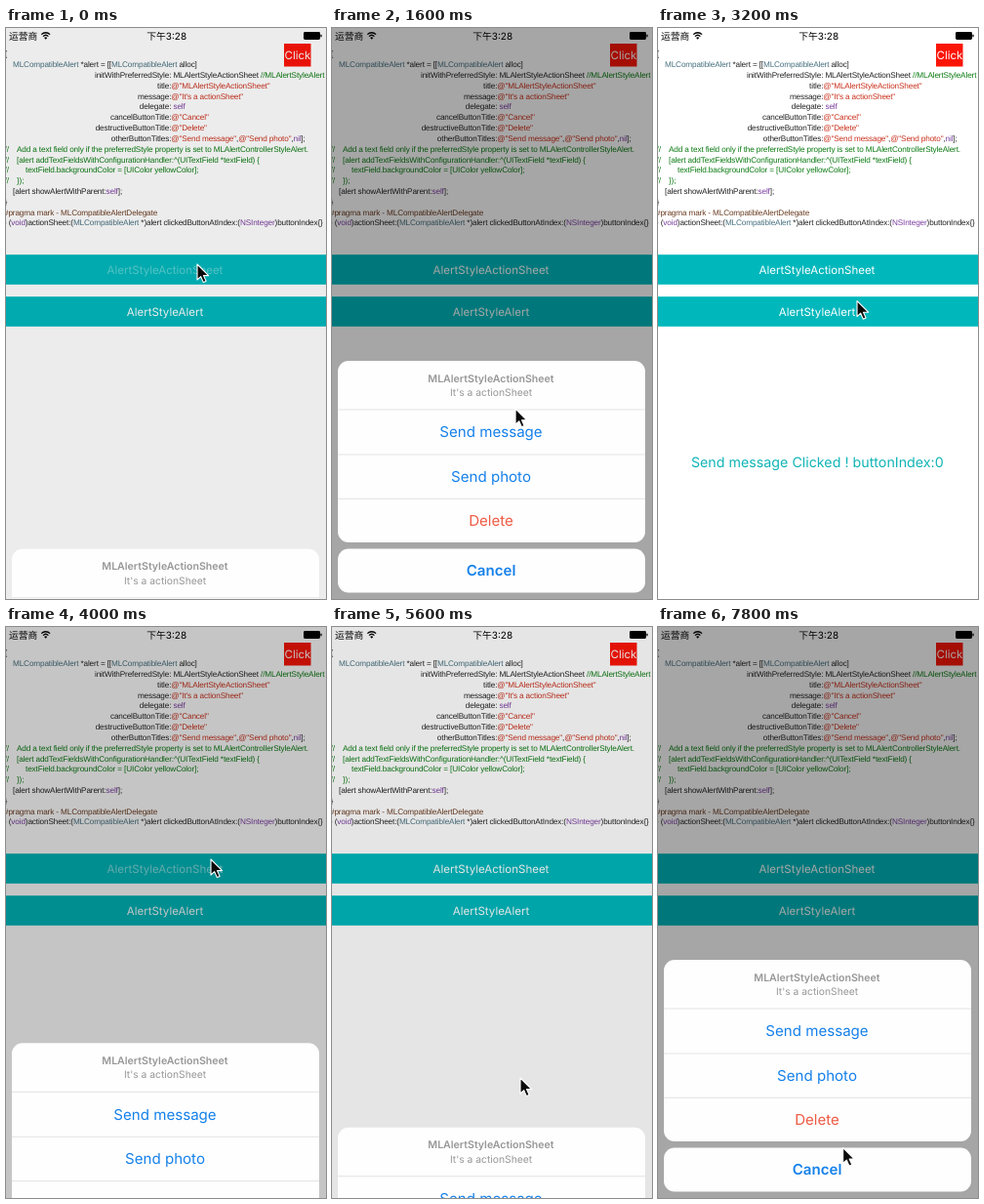
An HTML page for the animation above (8 s loop, 328 by 585 pixels).

```html
<!DOCTYPE html>
<html lang="en">
<head>
<meta charset="utf-8">
<title>Action sheet demo</title>
<style>
  html, body { margin: 0; width: 100%; height: 100%; overflow: hidden; background: #fff; }
  svg { display: block; width: 100vw; height: 100vh; font-family: Inter, Roboto, sans-serif; text-rendering: geometricPrecision; }
  text { white-space: pre; }
  .code { font: 8.2px "Liberation Sans", Arial, sans-serif; letter-spacing: -.135px; fill: #222; }
  .cls { fill: #47707f; } .str { fill: #c9301c; } .com { fill: #0b7a12; }
  .key { fill: #7b3fa0; } .pre { fill: #6b3d22; }
  .cjk { font: 9.8px "Noto Sans CJK SC", "Noto Sans CJK", sans-serif; }
  .mid { text-anchor: middle; }
  .btn { font-size: 11.5px; fill: #fff; }
  .row { font-size: 15.1px; fill: #1580ea; }
  .gray { font-size: 10.3px; fill: #979797; }
</style>
</head>
<body>
<svg id="stage" viewBox="0 0 328 585" preserveAspectRatio="none">
  <rect width="328" height="585" fill="#fff"/>

  <g id="status">
    <text class="cjk" x="3" y="11.6">运营商</text>
    <path d="M36.3 6.6a6.2 6.2 0 0 1 8.8 0M38 8.6a3.9 3.9 0 0 1 5.4 0" fill="none" stroke="#000" stroke-width="1.3"/>
    <path d="M40.7 11.8l-1.6-1.8a2.3 2.3 0 0 1 3.2 0z"/>
    <text class="mid" x="164.7" y="11.6" font-size="10"><tspan class="cjk">下午</tspan>3:28</text>
    <rect x="305" y="4" width="17" height="8" rx="1.4"/>
    <rect x="322.4" y="6.6" width="1.2" height="2.8" rx=".6"/>
  </g>

  <g id="code" class="code"></g>

  <rect x="285" y="16" width="27.5" height="23.5" fill="#fb1507"/>
  <text class="mid" x="299" y="32" font-size="11.5" fill="#fff">Click</text>

  <g fill="#00b8bc">
    <rect y="232.2" width="328" height="30.6"/>
    <rect y="275.2" width="328" height="30.6"/>
  </g>
  <text id="press" class="btn mid" x="163" y="251.6">AlertStyleActionSheet</text>
  <text class="btn mid" x="163" y="294.8">AlertStyleAlert</text>
  <text id="label" class="mid" x="163.3" y="450.3" font-size="14.25"></text>

  <rect id="dim" width="328" height="585"/>

  <g id="sheet">
    <rect x="6" y="341" width="315" height="186" rx="11" fill="#fefefe"/>
    <rect id="glow" x="6" width="315" height="45" fill="#f1f2f2"/>
    <path d="M6 391h315M6 437h315M6 482.3h315" stroke="#dcdcdc" stroke-width=".8"/>
    <text class="gray mid" x="163" y="362.6" style="font-weight:600;font-size:10.6px">MLAlertStyleActionSheet</text>
    <text class="gray mid" x="163" y="376.8">It's a actionSheet</text>
    <text class="row mid" x="163" y="419.4">Send message</text>
    <text class="row mid" x="163" y="465">Send photo</text>
    <text class="row mid" x="163" y="510.4" style="fill:#ee5a43">Delete</text>
    <rect x="6" y="533.5" width="315" height="45" rx="11" fill="#fefefe"/>
    <text class="row mid" x="163" y="561.4" font-weight="600">Cancel</text>
  </g>

  <path id="cursor" d="M0 0V16L3.7 12.6L6.3 18.6L9.1 17.4L6.5 11.6H11.6Z" fill="#0a0a0a" stroke="#fff" stroke-width="1.1" stroke-linejoin="round"/>
</svg>

<script>
const $ = id => document.getElementById(id);
const code = $("code");

// Code listing: parts are plain strings or [class, string].
const COLON = 169.3;
let baseline = 29.2;

function write(x, parts, anchor = "start") {
  const text = document.createElementNS(code.namespaceURI, "text");
  text.setAttribute("x", x);
  text.setAttribute("y", baseline);
  text.setAttribute("text-anchor", anchor);
  for (const part of parts) {
    const [cls, str] = Array.isArray(part) ? part : ["", part];
    const span = document.createElementNS(code.namespaceURI, "tspan");
    span.setAttribute("class", cls);
    span.textContent = str;
    text.append(span);
  }
  code.append(text);
}

function line(x, ...parts) {
  write(x, parts);
  baseline += 10.83;
}

function argument(name, ...parts) {
  write(COLON, [name + ":"], "end");
  line(COLON, ...parts);
}

function comment(x, str) {
  write(-1.5, [["com", "//"]]);
  line(x, ["com", str]);
}

line(-1.5, "{");
line(7, ["cls", "MLCompatibleAlert"], " *alert = [[", ["cls", "MLCompatibleAlert"], " alloc]");
argument("initWithPreferredStyle", "\u00a0MLAlertStyleActionSheet ", ["com", "//MLAlertStyleAlert"]);
argument("title", ["str", '@"MLAlertStyleActionSheet"']);
argument("message", ["str", '@"It\'s a actionSheet"']);
argument("delegate", ["key", "\u00a0self"]);
argument("cancelButtonTitle", ["str", '@"Cancel"']);
argument("destructiveButtonTitle", ["str", '@"Delete"']);
argument("otherButtonTitles", ["str", '@"Send message"'], ",", ["str", '@"Send photo"'], ",", ["key", "nil"], "];");
comment(11, "Add a text field only if the preferredStyle property is set to MLAlertControllerStyleAlert.");
comment(11, "[alert addTextFieldsWithConfigurationHandler:^(UITextField *textField) {");
comment(20, "textField.backgroundColor = [UIColor yellowColor];");
comment(11, "});");
line(7, "[alert showAlertWithParent:", ["key", "self"], "];");
line(-1.5, "}");
line(-2, ["pre", "#pragma mark - MLCompatibleAlertDelegate"]);
line(-2, "- (", ["key", "void"], ")actionSheet:(", ["cls", "MLCompatibleAlert"],
  " *)alert clickedButtonAtIndex:(", ["key", "NSInteger"], ")buttonIndex{}");

// Each round: press the button, the sheet opens, pick a row, the sheet closes, a label reports it.
const rounds = [
  { open: -34, close: 1900, from: { x: 196, y: 242 }, pick: { x: 188, y: 391 }, name: "Send message", color: "#10b4b6" },
  { open: 3867, close: 5450, from: { x: 210, y: 238 }, pick: { x: 193, y: 462 }, name: "Send photo", color: "#f0862a" },
  { open: 6860, close: 8100, from: { x: 245, y: 250 }, pick: { x: 188, y: 542 }, name: "Cancel" }
];
const LOOP = 8000, STEP = 200, SLIDE = 450, REST = 500, HOLD = 250, REPORT = 700;
const HEIGHT = 244, SHADE = .35, ROW = 45.6;

const ramp = (t, a, b) => Math.min(1, Math.max(0, (t - a) / (b - a)));
const easeOut = k => 1 - (1 - k) ** 3;
const smooth = k => k * k * (3 - 2 * k);
const slide = (t, start) => easeOut(ramp(t, start, start + SLIDE));

function cursorAt(t) {
  const p = { ...rounds[0].from };
  const move = (to, a, b) => {
    const k = smooth(ramp(t, a, b));
    p.x += (to.x - p.x) * k;
    p.y += (to.y - p.y) * k;
  };
  rounds.forEach((round, i) => {
    if (i) move(round.from, rounds[i - 1].close + REST, round.open - HOLD);
    move(round.pick, round.open + REST, round.close - HOLD);
  });
  return p;
}

function draw(t) {
  const index = rounds.findLastIndex(r => t >= r.open);
  const { open, close, name, color } = rounds[index];
  const next = rounds[index + 1];
  const shown = slide(t, open) - slide(t, close);
  const held = next && t >= next.open - HOLD - 50;
  const { x, y } = cursorAt(t);

  $("sheet").setAttribute("transform", `translate(0 ${HEIGHT * (1 - shown)})`);
  $("dim").setAttribute("opacity", SHADE * shown);
  $("glow").setAttribute("y", 391.4 + ROW * index);
  $("glow").setAttribute("opacity", t >= close - HOLD ? 1 : 0);
  $("press").setAttribute("opacity", held ? .07 : .3 + .7 * ramp(t, open, open + SLIDE));
  $("label").textContent = t >= close + REPORT ? `${name} Clicked ! buttonIndex:${index}` : "";
  $("label").setAttribute("fill", color || "none");
  $("cursor").setAttribute("transform", `translate(${x} ${y})`);
}

// The screen refreshes in fixed steps.
const start = performance.now();
function tick() {
  const t = (performance.now() - start) % LOOP;
  draw(Math.floor(t / STEP) * STEP);
  requestAnimationFrame(tick);
}
tick();
</script>
</body>
</html>
```
